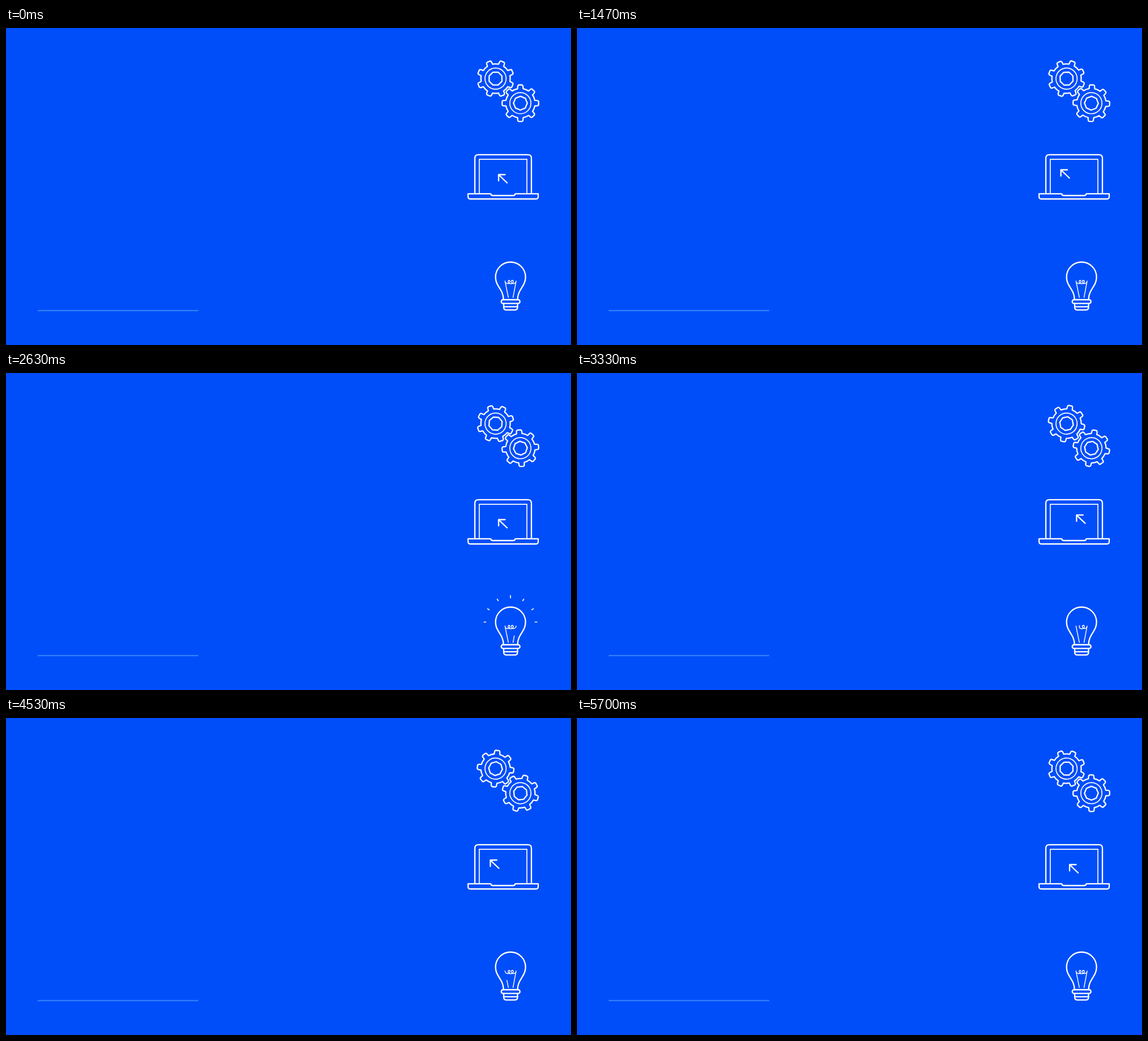
Recreate the animation shown at these times as an HTML page. Size 999 by 560 pixels, loop 5730 ms.

```html
<!DOCTYPE html>
<html lang="en">
<head>
<meta charset="utf-8">
<title>Gears, laptop and bulb</title>
<style>
  html, body { margin: 0; width: 100%; height: 100%; overflow: hidden; background: #004efa; }
  svg { display: block; width: 999px; height: 560px; }
  .ink { fill: none; stroke: #fff; stroke-width: 2.3; stroke-linecap: round; stroke-linejoin: round; }
  .thin { stroke-width: 1.7; }
  .fine { stroke-width: 1.4; }
</style>
</head>
<body>
<svg viewBox="0 0 999 560">
  <path d="M56 499.3H340" stroke="#3b83fc" stroke-width="2"/>
  <g class="ink">
    <g id="gearA"></g>
    <g id="gearB"></g>

    <path d="M829 292V230Q829 223.8 835.2 223.8H922.8Q929 223.8 929 230V292"/>
    <path class="thin" d="M836.8 292V231.8H921V292"/>
    <path d="M817 292.8H857Q857.5 296 861 296H896.500Q900 296 900.5 292.8H941V298Q941 302 937 302H821Q817 302 817 298Z"/>
    <path id="arrow" d="M886 273.5L871 259.2M871 270V259H882.5"/>

    <path d="M879.6 480C879.6 461 865.6 457 865.6 440A26.5 26.5 0 0 1 918.6 440C918.6 457 904.600 461 904.600 480"/>
    <rect x="875.7" y="480" width="33" height="6.600" rx="3.2"/>
    <path d="M880 487V493Q880 498.200 885 498.200H899.500Q904.5 498.200 904.5 493V487M880 492.300H904.5"/>
    <path id="filament" class="fine" d="M888.2 476L882.3 447C883 453 891 452.5 891 448C891 445 888 445 888 448C888 453 897 453 897 448C897 445 893.5 445 893.5 448C893.5 452.5 901 453 902 447L896.5 476"/>
    <path id="rays" class="thin"/>
    <path id="dots" class="thin"/>
  </g>
</svg>
<script>
const LOOP = 5730, FPS = 30;
const CYCLE = 87;          // gears and cursor, in steps of 1/30 s
const GLOW = CYCLE / 2;    // bulb
const ARROW_KEYS = [[0, 0, 0], [18, 15.3, -10], [45, -15.5, -8.5], [72, 0, 0], [87, 0, 0]];

const el = id => document.getElementById(id);
const clamp = v => Math.max(0, Math.min(1, v));
const ease = v => { v = clamp(v); return v * v * (3 - 2 * v); };
const polar = (r, deg) => {
  const a = deg * Math.PI / 180;
  return (r * Math.sin(a)).toFixed(2) + ' ' + (-r * Math.cos(a)).toFixed(2);
};

function gearMarkup() {
  let rim = '', core = '';
  for (let i = 0; i < 8; i++) {
    const p = (r, d) => polar(r, i * 45 + d);
    rim += (i ? 'A26 26 0 0 1 ' : 'M') + p(26, -11) +
      `L${p(30.2, -8.8)}Q${p(32.2, -8)} ${p(32.4, -5)}L${p(32.4, 5)}` +
      `Q${p(32.2, 8)} ${p(30.2, 8.8)}L${p(26, 11)}`;
    core += (i ? 'L' : 'M') + p(12.2, 0);
  }
  rim += `A26 26 0 0 1 ${polar(26, -11)}Z`;
  return `<path d="${rim}"/><circle r="18.7" class="thin"/><path d="${core}Z"/>`;
}

function arrowAt(f) {
  let i = 0;
  while (i < ARROW_KEYS.length - 2 && f >= ARROW_KEYS[i + 1][0]) i++;
  const [f0, x0, y0] = ARROW_KEYS[i], [f1, x1, y1] = ARROW_KEYS[i + 1];
  const k = ease((f - f0) / (f1 - f0));
  return [x0 + (x1 - x0) * k, y0 + (y1 - y0) * k];
}

const filament = el('filament');
const wire = filament.getTotalLength();

// A short gap runs along the filament from one foot to the other.
function drawFilament(f) {
  const half = 8 * clamp(Math.min((f - 0.7) / 4, (40 - f) / 4));
  if (half <= 0) {
    filament.setAttribute('stroke-dasharray', 'none');
    return;
  }
  const mid = wire / 2 + (f - 20.5) * (wire / 2 - 21) / 15;
  filament.setAttribute('stroke-dasharray', `${Math.max(0, mid - half)} ${2 * half} ${wire} 0`);
}

function drawRays(f) {
  const open = Math.min(clamp((f - 13.5) / 5.5), clamp((38 - f) / 9));
  let rays = '', dots = '';
  for (let a = -90; a <= 90 && open > 0; a += 30) {
    const inner = a ? 38.5 : 36;
    const at = r => polar(r, a);
    rays += `M${at(45.5 - (45.5 - inner) * open)}L${at(45.5 + 4.5 * open)}`;
    if (open > 0.9) dots += `M${at(a ? 34.8 : 31)}h.01`;
  }
  el('rays').setAttribute('d', rays);
  el('dots').setAttribute('d', dots);
}

function draw(t) {
  const step = t * FPS / 1000;
  const f = step % CYCLE;
  const turn = 180 * ease(f / CYCLE);
  el('gearA').setAttribute('transform', `translate(865.6 89.4) rotate(${22.5 - turn})`);
  el('gearB').setAttribute('transform', `translate(909.5 132.8) rotate(${turn})`);
  el('arrow').setAttribute('transform', `translate(${arrowAt(f)})`);
  const g = step % GLOW;
  drawFilament(g);
  drawRays(g);
}

el('gearA').innerHTML = el('gearB').innerHTML = gearMarkup();
for (const id of ['rays', 'dots']) el(id).setAttribute('transform', 'translate(892 440)');

const start = performance.now();
function tick() {
  draw((performance.now() - start) % LOOP);
  requestAnimationFrame(tick);
}
tick();
</script>
</body>
</html>
```
